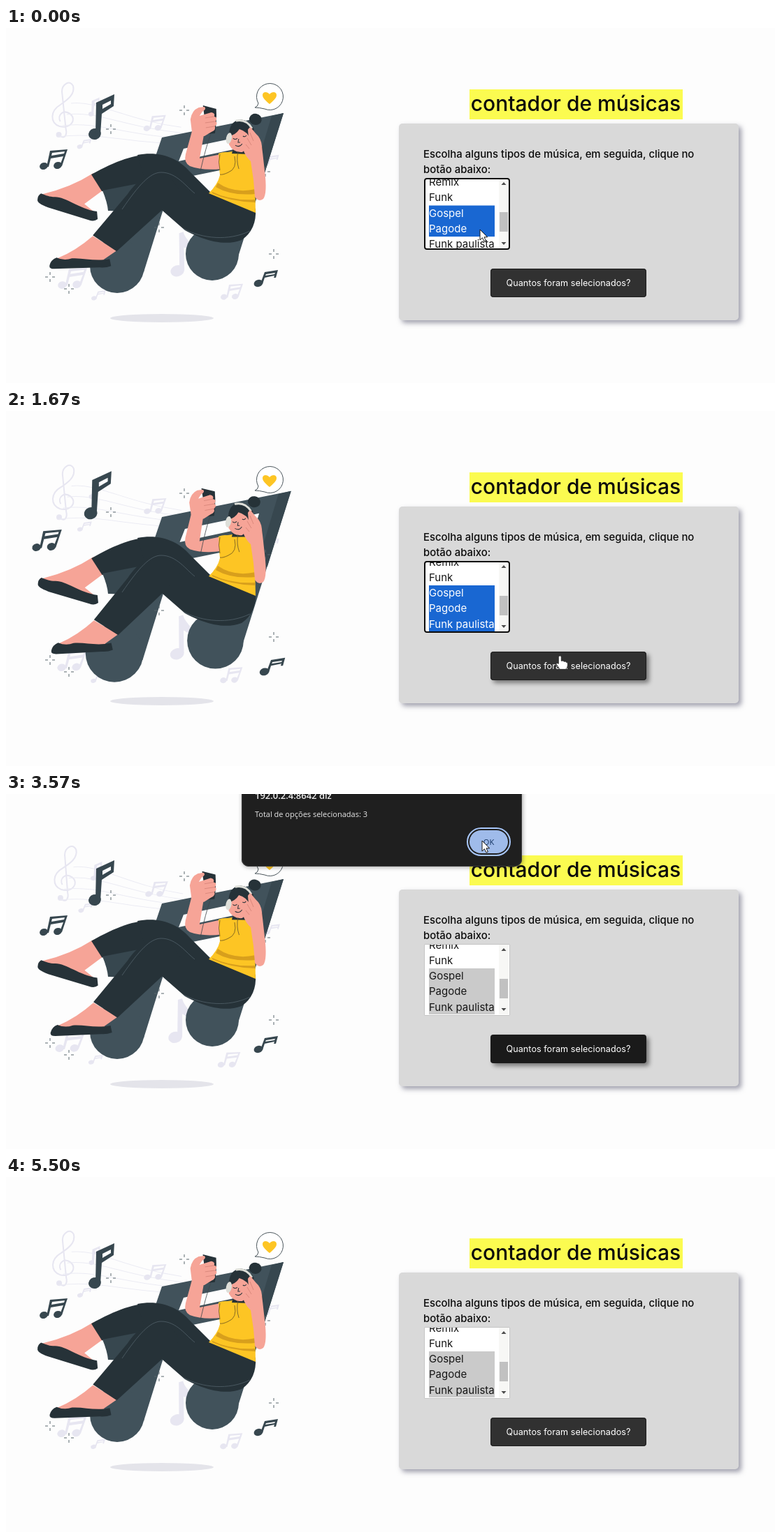
Recreate the animation shown at these times as an HTML page with a canvas. Size 1100 by 509 pixels, loop 5530 ms.

```html
<!DOCTYPE html>
<html lang="pt-BR">
<head>
<meta charset="utf-8">
<title>contador de músicas</title>
<style>
  html, body { margin: 0; width: 100%; height: 100%; overflow: hidden; background: #fdfdfd; }
  canvas { display: block; width: 1100px; height: 509px; }
</style>
</head>
<body>
<canvas id="stage" width="1100" height="509"></canvas>
<script>
const ctx = document.getElementById('stage').getContext('2d');
const LOOP = 5530;
const PAGE = '#fdfdfd', INK = '#263238', SLATE = '#41525b', NOTE = '#37474f';
const SKIN = '#f6a497', FAINT = '#e7e6f1', YELLOW = '#fdc524';
const UI = 'Inter, sans-serif', SYSTEM = '"Open Sans", sans-serif';
const CLICK = 2060, ALERT_ON = 2200, ALERT_OFF = 4200, PICK = 720;

const pointerPath = [
  [0, 678, 289], [650, 692, 310], [1150, 692, 310], [1600, 793, 351], [2100, 799, 358],
  [2850, 799, 358], [3350, 681, 67], [4600, 681, 67], [4950, 700, -24]
];

function shape(d, fill, stroke, width = 1) {
  const p = new Path2D(d);
  if (fill) { ctx.fillStyle = fill; ctx.fill(p, 'evenodd'); }
  if (stroke) { ctx.strokeStyle = stroke; ctx.lineWidth = width; ctx.stroke(p); }
}

function oval(x, y, rx, ry, fill, turn = 0) {
  ctx.beginPath();
  ctx.ellipse(x, y, rx, ry, turn, 0, Math.PI * 2);
  ctx.fillStyle = fill;
  ctx.fill();
}

function box(x, y, w, h, r, fill, stroke, width = 1) {
  ctx.beginPath();
  ctx.roundRect(x, y, w, h, r);
  if (fill) { ctx.fillStyle = fill; ctx.fill(); }
  if (stroke) { ctx.strokeStyle = stroke; ctx.lineWidth = width; ctx.stroke(); }
}

function text(s, x, y, font, fill, align = 'left') {
  ctx.font = font;
  ctx.fillStyle = fill;
  ctx.textAlign = align;
  ctx.fillText(s, x, y);
}

function group(draw) { ctx.save(); draw(); ctx.restore(); }

function turned(angle, x, y, draw) {
  group(() => {
    ctx.translate(x, y);
    ctx.rotate(angle);
    ctx.translate(-x, -y);
    draw();
  });
}

function shadowed(color, offset, blur, draw) {
  group(() => {
    ctx.shadowColor = color;
    ctx.shadowOffsetX = ctx.shadowOffsetY = offset;
    ctx.shadowBlur = blur;
    draw();
  });
}

// Motion

function pulse(t) {
  if (t > 2100 && t < 2600) return 1; // the page stalls while the alert opens
  const u = ((t - 150 + 1432) % 1432) / 1432;
  const rise = u < .1 ? u / .1 : u < .3 ? (.3 - u) / .2 : Math.max(0, 1 - Math.abs(u - .5) / .1);
  return 1 + .1 * rise;
}

const sway = t => (1 + Math.cos(2 * Math.PI * (t - 1250) / 3100)) / 2;

function breeze(t) {
  const u = (((t - 600) / 6000) % 1 + 1) % 1;
  return (1 - Math.abs(2 * u - 1)) * .035;
}

function pointerAt(t) {
  let i = 0;
  while (i < pointerPath.length - 2 && t > pointerPath[i + 1][0]) i++;
  const [t0, x0, y0] = pointerPath[i], [t1, x1, y1] = pointerPath[i + 1];
  const u = Math.min(1, (t - t0) / (t1 - t0)), e = u * u * (3 - 2 * u);
  return [x0 + (x1 - x0) * e, y0 + (y1 - y0) * e];
}

// Illustration

function pairNote(x, y, size, color) {
  group(() => {
    ctx.translate(x, y);
    ctx.scale(size, size);
    oval(-14, 10, 6, 5, color, -.3);
    oval(6, 9, 6, 5, color, -.3);
    shape('M-10 11L-5 -12L20 -14L12 10L9 9L14 -4L-4 -1L-7 11ZM-2 -9L16 -11L15 -8L-3 -5Z', color);
  });
}

function singleNote(x, y, size, color) {
  group(() => {
    ctx.translate(x, y);
    ctx.scale(size, size);
    oval(0, 0, 6.5, 5, color, -.3);
    shape('M3 0L9 -16L28 -19L25 -8L22 -8L23 -11L9 -8L6 1ZM11 -13L24 -15L23 -13L10 -11Z', color);
  });
}

function tallNote(x, y, size, color) {
  group(() => {
    ctx.translate(x, y);
    ctx.scale(size, size);
    oval(0, 0, 9, 8, color, -.3);
    shape('M1 -1L2 -45L28 -57L27 -40L10 -29L8 1ZM11 -42L23 -48L23 -43L11 -36Z', color);
  });
}

function faintMusic() {
  shape('M77 156C84 161 87 153 85 146L79 92C79 82 90 74 95 84C98 96 87 104 77 111C62 120 62 137 76 142C92 146 101 132 91 124C81 117 72 126 77 135', null, FAINT, 2);
  oval(75, 154, 4, 4, FAINT);
  for (let i = 0; i < 4; i++)
    shape(`M${92 - i * 6} ${109 + i * 16}C130 ${104 + i * 15} 170 ${132 + i * 11} 250 ${142 + i * 8}`, null, '#ececf4');
  tallNote(121, 124, .42, FAINT);
  pairNote(212, 136, .8, FAINT);
  singleNote(105, 171, .6, FAINT);
  singleNote(372, 193, .65, FAINT);
  oval(246, 348, 10, 8, FAINT, -.3);
  shape('M249 347L248 294L254 292C258 307 275 310 266 331C267 319 260 317 255 314L256 347Z', FAINT);
  pairNote(96, 359, 1.05, FAINT);
  singleNote(127, 388, .6, FAINT);
  pairNote(324, 377, .8, FAINT);
}

function darkMusic() {
  shape('M223 157L397 122L332 328H295L345 196L238 218L197 350L160 342ZM254 173L354 152L349 169L247 191Z', SLATE);
  shape('M397 122L380 126L351 223L365 224Z', NOTE);
  oval(159, 341, 39, 39, SLATE);
  oval(295, 324, 38, 38, SLATE);
  tallNote(127, 152, 1, NOTE);
  pairNote(68, 188, 1, NOTE);
  singleNote(361, 366, 1, NOTE);
}

function sparkle(x, y) {
  shape(`M${x - 7} ${y}h4M${x + 3} ${y}h4M${x} ${y - 7}v4M${x} ${y + 3}v4`, null, '#59666d');
}

function heartBubble() {
  shape('M361 108A19 19 0 1 1 370 116Q362 114 356 114Q360 113 361 108Z', '#fff', '#4a555b');
  shape('M377 109C370 103 367 100 367 96C367 91 374 91 377 95C380 91 387 91 387 96C387 100 384 103 377 109Z', YELLOW);
}

function legs(k) {
  turned(-.015 * k, 213, 195, () => {
    shape('M125 208L138 233L112 252L130 267L62 247L52 238Q92 229 125 208Z', SKIN);
    shape('M50 237C58 240 62 242 70 242C86 242 104 259 130 263L131 274Q126 278 118 275L60 257Q44 251 45 246Q45 240 50 237Z', INK);
    shape('M122 210C158 190 184 181 210 181L222 228L137 234Z', INK);
  });
  shape('M138 233L205 220L175 263L146 262Q145 250 138 233Z', NOTE);
  shape('M188 182C220 176 246 186 264 207L293 236L357 259Q359 289 337 304C308 315 275 300 256 290L208 248Z', INK);
  turned(-.028 * k, 218, 220, () => {
    shape('M124 298L158 319L139 332L147 335L82 340L73 330Q100 319 124 298Z', SKIN);
    shape('M72 329Q83 334 94 330C111 329 126 335 148 331L150 341Q142 344 134 343L69 345Q61 345 62 340Q64 332 72 329Z', INK);
    shape('M124 297L174 238C190 215 214 200 232 209L249 234L222 262L158 320Z', INK);
  });
  shape('M166 260C190 225 206 207 222 207C244 207 258 228 270 237M254 288C281 302 318 306 349 291', null, '#52616a', .8);
}

function torso() {
  shape('M304 180L324 177L349 180Q364 197 356 218L357 265L290 237Q303 224 306 211Z', YELLOW);
  shape('M303 222Q326 238 357 231L357 238Q322 241 300 228ZM295 235Q322 248 356 246L356 250Q321 249 295 237Z', '#d89f1c');
}

function phoneArm() {
  shape('M267 145L284 149L277 187L308 181L309 202Q281 205 263 198Q254 193 257 181Z', SKIN);
  shape('M282 111L301 116Q302 135 299 151L287 152Z', INK);
  shape('M264 131Q266 118 276 114L284 113Q288 116 281 120L277 126L294 121Q300 122 298 127Q304 128 300 134Q304 136 299 141Q301 146 294 149L284 155Q272 156 266 148Z', SKIN);
  shape('M285 129L298 127M285 136L300 134M286 143L299 141', null, '#cf7d72', .7);
  shape('M293 152Q286 171 278 205', null, '#3f464b', .8);
}

function sleeve() {
  shape('M304 180Q315 175 326 182L328 203Q317 211 306 210Z', YELLOW);
  shape('M327 184Q331 202 318 207Q310 211 306 210M306 181Q303 192 306 204', null, '#6b5520', .8);
}

function head() {
  shape('M333 147Q356 147 367 172Q370 194 348 181L323 180Z', INK);
  oval(357, 131, 9, 8, INK, .2);
  shape('M320 149Q322 136 337 136L351 147Q352 168 338 178Q325 179 319 167Z', SKIN);
  shape('M319 155Q319 136 332 132Q346 129 355 145L349 160Q347 149 334 145Q329 153 319 155Z', INK);
  oval(319, 158, 4, 8, '#dedfd9', .2);
  shape('M329 133Q344 130 352 144', null, '#dedfd9', 3);
  shape('M325 158Q328 161 331 158M339 155Q342 157 344 154M333 159L332 164L335 164M328 168Q334 172 338 166', null, INK, 1);
  shape('M332 177Q329 190 333 202', null, '#655630', .8);
}

function headArm() {
  shape('M346 146Q350 139 352 145L357 151Q365 158 366 169L370 205Q374 237 368 245Q361 250 356 242L354 218L350 191Q343 185 339 174Q336 164 342 164L346 166L343 157Q344 153 347 158Z', SKIN);
  shape('M349 150L354 162M345 158L351 168M343 167L348 173', null, '#cf7d72', .7);
}

function illustration(t) {
  const k = sway(t), s = pulse(t);
  oval(223, 416, 74, 6, '#e4e4ea');
  turned(breeze(t), 220, 235, faintMusic);
  group(() => {
    ctx.translate(222, 238);
    ctx.scale(s, s);
    ctx.translate(-222, -238);
    darkMusic();
  });
  for (const [x, y] of [[150, 145], [255, 118], [383, 324], [63, 357], [90, 374], [219, 286], [371, 206]])
    sparkle(x, y);
  heartBubble();
  legs(k);
  torso();
  turned(-.035 * k, 270, 195, phoneArm);
  sleeve();
  turned(-.05 * k, 338, 182, head);
  headArm();
}

// Interface

function songList(t) {
  const focused = t < CLICK, picked = t >= PICK;
  const shift = picked ? -4.5 : 0;
  box(598, 215, 123, 103, focused ? 3 : 0, '#fff');
  group(() => {
    ctx.beginPath();
    ctx.rect(600, 216, 119, 100);
    ctx.clip();
    ctx.fillStyle = focused ? '#1967d2' : '#cacaca';
    ctx.fillRect(605, 254.5 + shift, 94, picked ? 67 : 44.6);
    ['Remix', 'Funk', 'Gospel', 'Pagode', 'Funk paulista'].forEach((name, i) => {
      const lit = focused && i > 1 && i < (picked ? 5 : 4);
      text(name, 605, 226 + i * 22.3 + shift, `400 15px ${UI}`, lit ? '#fff' : '#161616');
    });
    ctx.fillStyle = '#f7f7f5';
    ctx.fillRect(705, 216, 14, 100);
    ctx.fillStyle = '#c1c1c1';
    ctx.fillRect(706, picked ? 265 : 264, 12, 28);
    shape('M708.5 225L712 221L715.5 225ZM708.5 307L712 311L715.5 307Z', '#4c4c4c');
  });
  if (focused) box(599, 216, 121, 101, 3, null, '#0c0c0c', 2);
  else box(598.5, 215.5, 122, 102, 0, null, '#c4c4c4');
}

function countButton(t, hovered) {
  const pressed = t >= CLICK && t < ALERT_OFF;
  const draw = () => box(693, 345, 223, 41, 4, pressed ? '#1a1a1a' : '#313131');
  if (hovered || pressed) shadowed('rgba(0,0,0,.45)', 4, 6, draw);
  else draw();
  if (!pressed) box(693.5, 345.5, 222, 40, 4, null, '#1d1d1d');
  text('Quantos foram selecionados?', 804.5, 369.5, `400 12.7px ${UI}`, '#fff', 'center');
}

function page(t, hovered) {
  ctx.fillStyle = '#fbfb50';
  ctx.fillRect(663, 88, 305, 43);
  text('contador de músicas', 815, 119, `500 30px ${UI}`, '#0b0b0b', 'center');
  shadowed('rgba(70,70,95,.5)', 4, 7, () => box(562, 137, 486, 282, 5, '#d9d9d9'));
  text('Escolha alguns tipos de música, em seguida, clique no', 597, 186, `500 14.9px ${UI}`, '#0b0b0b');
  text('botão abaixo:', 597, 208, `500 14.9px ${UI}`, '#0b0b0b');
  songList(t);
  countButton(t, hovered);
}

function alertBox(hoverOk) {
  shadowed('rgba(0,0,0,.35)', 1, 6, () => box(337, -30, 401, 134, 10, '#1f1f1f'));
  box(337.5, -30, 400, 133.5, 10, null, '#3b3b3b');
  text('192.0.2.4:8642 diz', 356, 7, `600 13px ${SYSTEM}`, '#f0f0f0');
  text('Total de opções selecionadas: 3', 356, 33, `400 11px ${SYSTEM}`, '#e8e8e8');
  box(660, 49, 61, 39, 19.5, null, '#a8c7fa', 2);
  box(663, 52, 55, 33, 16.5, hoverOk ? '#9fbbea' : '#a8c7fa');
  text('OK', 690.5, 73, `400 11px ${SYSTEM}`, '#123160', 'center');
}

function pointer(x, y, hand) {
  group(() => {
    ctx.translate(x, y);
    ctx.lineJoin = 'round';
    if (hand) shape('M-3 1Q-1 -2 1 1V7Q4 6 5 8Q8 7 8 9Q11 9 10 14Q9 19 7 19H-1L-6 12Q-7 9 -3 11Z', '#fff', '#202020', .8);
    else shape('M0 0V15L3.4 11.7L6 17L8.4 16L6 10.8H10.7Z', '#fff', '#161616');
  });
}

function render(t) {
  const [x, y] = pointerAt(t);
  const overButton = x > 693 && x < 916 && y > 345 && y < 386;
  const overOk = x > 663 && x < 718 && y > 52 && y < 85;
  ctx.fillStyle = PAGE;
  ctx.fillRect(0, 0, 1100, 509);
  illustration(t);
  page(t, overButton);
  if (t >= ALERT_ON && t < ALERT_OFF) alertBox(overOk);
  pointer(x, y, overButton);
}

let start;
function tick(now) {
  start ??= now;
  render((now - start) % LOOP);
  requestAnimationFrame(tick);
}
requestAnimationFrame(tick);
</script>
</body>
</html>
```
